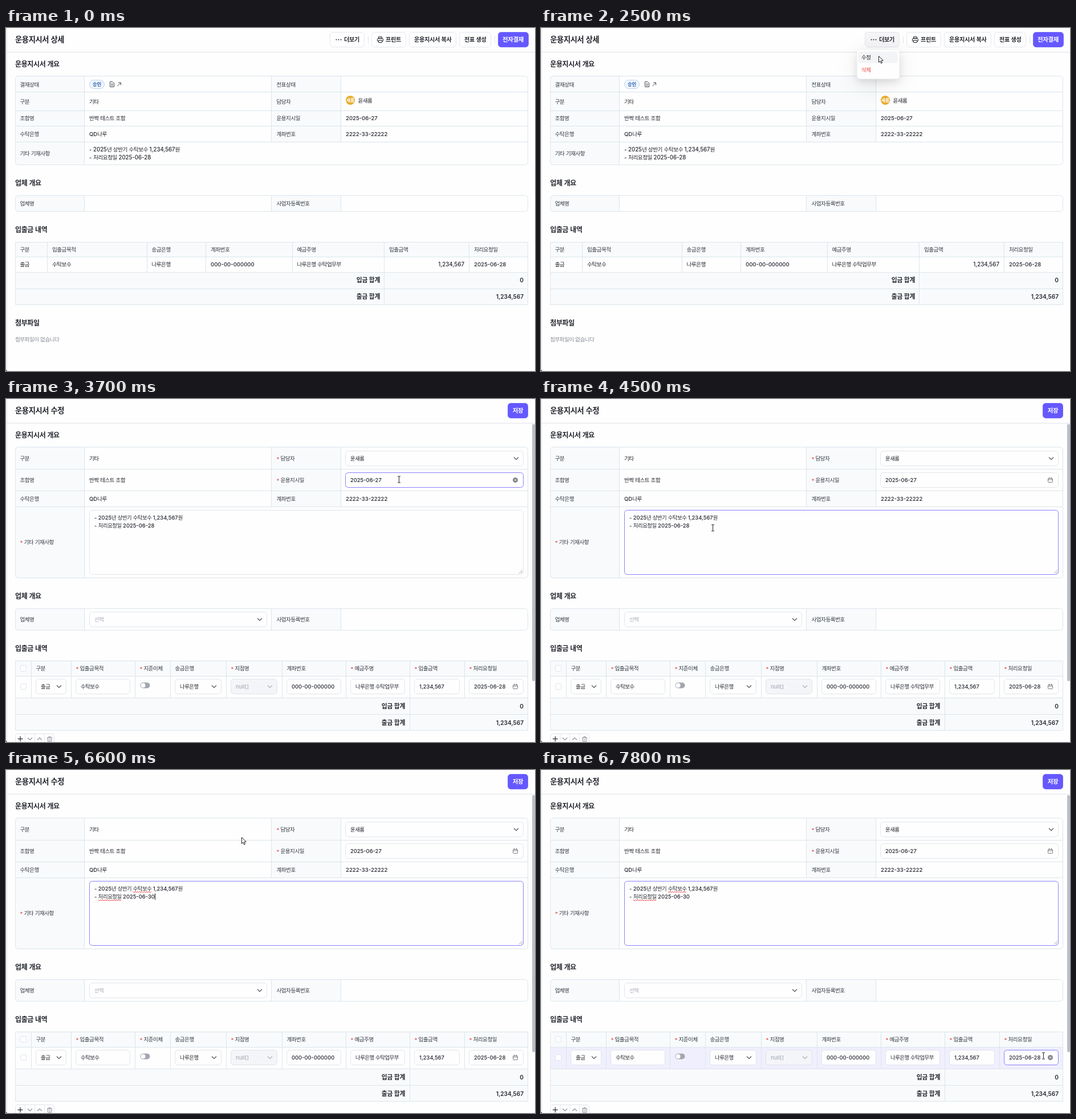
These frames come from a looping animation (928 by 603 pixels, 8 s). An HTML page with a canvas:

```html
<!DOCTYPE html>
<html lang="ko">
<head>
<meta charset="utf-8">
<title>운용지시서</title>
<style>
html, body { margin: 0; width: 100%; height: 100%; overflow: hidden; background: #fefefe; }
canvas { display: block; width: 928px; height: 603px; }
</style>
</head>
<body>
<canvas id="stage" width="928" height="603"></canvas>
<script>
const ctx = document.getElementById('stage').getContext('2d');
const LOOP = 8000, STEP = 100;
const FAMILY = 'Inter, "Noto Sans CJK KR", "Noto Sans CJK", "Noto Sans CJK JP", sans-serif';
const INK = '#23262d', LABEL = '#33373f', MUTED = '#a8aeb8', LINE = '#dce5eb', EDGE = '#d9dce5';
const TINT = '#f8fafc', PAPER = '#fefefe', PURPLE = '#6558ff', RED = '#ee4a44';
const BODY = 9.55, FIELD = 9.4, HAIR = 0.75;
const PERSON = '윤새롬', GROUP = '반짝 테스트 조합', TRUST = 'QD나루', BANK = '나루은행', HOLDER = BANK + ' 수탁업무부';
const NOTE = '- 2025년 상반기 수탁보수 1,234,567원', ASK = '- 처리요청일 2025-06-';

// Hangul and the rest are set in separate runs, as Hangul is tracked tighter.
function runs(s, size, weight, each) {
  ctx.font = `${weight} ${size}px ${FAMILY}`;
  let x = 0;
  for (const run of s.match(/[가-힣]+|[^가-힣]+/g) || []) {
    ctx.letterSpacing = /[가-힣]/.test(run) ? `${size * (weight >= 600 ? -0.03 : -0.05)}px` : '0px';
    if (each) each(run, x);
    x += ctx.measureText(run).width;
  }
  return x;
}

function text(s, x, cy, { size = BODY, weight = 450, color = INK, align = 0 } = {}) {
  const left = x - (align ? runs(s, size, weight) * align : 0);
  ctx.fillStyle = color;
  runs(s, size, weight, (run, dx) => ctx.fillText(run, left + dx, cy + size * 0.37));
}

const width = s => runs(s, FIELD, 450);
const label = (s, x, y) => text(s, x, y, { color: LABEL });
const heading = (s, y) => text(s, 16, y, { size: 12, weight: 600 });

function required(s, x, y) {
  text('*', x, y + 1, { color: RED });
  label(s, x + 7, y);
}

function path(points, color, w = 1, fill, close) {
  ctx.beginPath();
  points.forEach(([x, y], i) => i ? ctx.lineTo(x, y) : ctx.moveTo(x, y));
  if (close) ctx.closePath();
  if (fill) { ctx.fillStyle = fill; ctx.fill(); }
  if (color) { ctx.strokeStyle = color; ctx.lineWidth = w; ctx.stroke(); }
}

function rect(x, y, w, h, fill) {
  ctx.fillStyle = fill;
  ctx.fillRect(x, y, w, h);
}

function box(x0, y0, x1, y1, r, fill, edge, w = 1) {
  ctx.beginPath();
  ctx.roundRect(x0 + 0.5, y0 + 0.5, x1 - x0 - 1, y1 - y0 - 1, r);
  if (fill) { ctx.fillStyle = fill; ctx.fill(); }
  if (edge) { ctx.strokeStyle = edge; ctx.lineWidth = w; ctx.stroke(); }
}

function disc(x, y, r, fill) {
  ctx.beginPath();
  ctx.arc(x, y, r, 0, Math.PI * 2);
  ctx.fillStyle = fill;
  ctx.fill();
}

// rows: line heights; cols: [x, top, bottom]; tints: [x0, y0, x1, y1]
function grid(y0, y1, r, tints, rows, cols) {
  ctx.save();
  ctx.beginPath();
  ctx.roundRect(16, y0, 900, y1 - y0, r);
  ctx.clip();
  for (const [a, b, c, d, color = TINT] of tints) rect(a, b, c - a, d - b, color);
  for (const y of rows) rect(16, y, 900, 1, LINE);
  for (const [x, a = y0, b = y1] of cols) rect(x, a, 1, b - a, LINE);
  ctx.restore();
  box(16, y0, 916, y1, r, null, LINE);
}

const pairTints = (y0, y1, full = y1) => [[16, y0, 137, y1], [465, y0, 587, full]];
const pairCols = (y0, y1, full = y1) => [[137, y0, y1], [465, y0, full], [587, y0, full]];

function chevron(x, y, color = '#4b505a', d = 1, s = 4) {
  path([[x - s, y - d * s / 2], [x, y + d * s / 2], [x + s, y - d * s / 2]], color, 1.1);
}

function calendar(x, y) {
  box(x - 4.5, y - 3.5, x + 4.5, y + 4.5, 1, null, '#50555f', HAIR);
  path([[x - 4, y - 0.7], [x + 4, y - 0.7]], '#50555f', HAIR);
  path([[x - 2, y - 5], [x - 2, y - 2]], '#50555f', HAIR);
  path([[x + 2, y - 5], [x + 2, y - 2]], '#50555f', HAIR);
}

function clearMark(x, y) {
  disc(x, y, 4.5, '#84878d');
  path([[x - 1.6, y - 1.6], [x + 1.6, y + 1.6]], '#fff');
  path([[x + 1.6, y - 1.6], [x - 1.6, y + 1.6]], '#fff');
}

function input(x0, x1, cy, s, { edge = EDGE, fill = PAPER, color = INK, arrow } = {}) {
  box(x0, cy - 13.5, x1, cy + 13.5, 5, fill, edge, HAIR);
  ctx.save();
  ctx.beginPath();
  ctx.rect(x0 + 9, cy - 12, x1 - x0 - 20, 24);
  ctx.clip();
  text(s, x0 + 9, cy, { size: FIELD, color });
  ctx.restore();
  if (arrow) chevron(x1 - 13, cy, arrow);
}

function dateInput(x0, x1, cy, s, hot) {
  input(x0, x1, cy, s, { edge: hot ? PURPLE : EDGE });
  (hot ? clearMark : calendar)(x1 - 14.5, cy);
}

function button(x0, x1, s, tx, fill = PAPER) {
  const solid = fill === PURPLE;
  box(x0, 7, x1, 34, 5, fill, solid ? PURPLE : '#dddfe7', HAIR);
  text(s, tx, 20, { size: solid ? 10.4 : 10.1, weight: 600, color: solid ? '#fff' : INK });
}

function frame(title) {
  rect(0, 0, 928, 603, PAPER);
  rect(1, 0, 1, 603, '#e3e4e8');
  rect(2, 42, 926, 1, '#e2e3e9');
  path([[0, 600.5], [2, 603], [0, 603]], null, 0, '#444', true);
  text(title, 16, 20.5, { size: 13.3, weight: 600 });
}

function printer(x, y) {
  box(x - 3.5, y - 5.5, x + 3.5, y - 2, 0, null, INK);
  box(x - 5.5, y - 2.5, x + 5.5, y + 3.5, 1.5, PAPER, INK);
  box(x - 3.5, y + 0.5, x + 3.5, y + 5.5, 0.5, PAPER, INK);
}

function statusIcons() {
  box(146, 91, 173, 107, 8, '#f0f6fe', '#bdd5f2');
  text('승인', 159.5, 99, { size: 8.3, weight: 600, color: '#2c5fae', align: 0.5 });
  path([[182.5, 94.5], [187, 94.5], [189.5, 97], [189.5, 103.5], [182.5, 103.5]], '#4a4e57', 1, null, true);
  path([[184, 98.5], [188, 98.5]], '#4a4e57');
  path([[184, 101], [188, 101]], '#4a4e57');
  path([[195.5, 102], [201.5, 96]], '#4a4e57');
  path([[197, 96], [201.5, 96], [201.5, 100.5]], '#4a4e57');
}

function viewPage(active) {
  frame('운용지시서 상세');
  button(568, 629, '더보기', 593, active ? '#f5f5f7' : PAPER);
  for (const x of [579.5, 583.5, 587.5]) disc(x, 20.5, 1, INK);
  rect(635, 14, 1, 13, '#e2e4ea');
  button(641, 702, '프린트', 666);
  printer(656.5, 20.5);
  button(707, 790, '운용지시서 복사', 716);
  button(795, 851, '전표 생성', 804);
  rect(857, 14, 1, 13, '#e2e4ea');
  button(863, 917, '전자결재', 871, PURPLE);

  heading('운용지시서 개요', 63.5);
  grid(84, 241, 5, pairTints(84, 241, 200), [112, 145, 172, 200], pairCols(84, 241, 200));
  const rows = [['결재상태', '', '전표상태', '', 99], ['구분', '기타', '담당자', '', 129],
    ['조합명', GROUP, '운용지시일', '2025-06-27', 158.5], ['수탁은행', TRUST, '계좌번호', '2222-33-22222', 186.5]];
  for (const [a, b, c, d, y] of rows) {
    label(a, 24.5, y); text(b, 146, y); label(c, 474.5, y); text(d, 596, y);
  }
  statusIcons();
  disc(604, 127, 8, '#e9ac2e');
  text(PERSON.slice(1), 604, 127, { size: 7.8, weight: 600, color: '#fff', align: 0.5 });
  text(PERSON, 617.5, 127.5);
  label('기타 기재사항', 24.5, 220.5);
  text(NOTE, 146, 213, { size: 9.65 });
  text(ASK + '28', 146, 227.5, { size: 9.65 });

  heading('업체 개요', 273);
  grid(294, 323, 5, pairTints(294, 323), [], pairCols(294, 323));
  label('업체명', 24.5, 308.5);
  label('사업자등록번호', 474.5, 308.5);

  heading('입출금 내역', 355);
  grid(376, 487, 0, [[16, 376, 916, 402], [16, 429, 916, 487]], [402, 429, 458],
    [[72, 376, 429], [247, 376, 429], [350, 376, 429], [502, 376, 429], [663], [812, 376, 429]]);
  const cols = [[24.5, '구분', '출금'], [81, '입출금목적', '수탁보수'], [255.5, '송금은행', BANK],
    [359, '계좌번호', '000-00-000000'], [510.5, '예금주명', HOLDER], [672, '입출금액', ''], [821, '처리요청일', '2025-06-28']];
  for (const [x, a, b] of cols) { label(a, x, 389); text(b, x, 415.5); }
  text('1,234,567', 804, 415.5, { size: 9.8, align: 1 });
  totals(656, 443.5, 472.5);

  heading('첨부파일', 519);
  text('첨부파일이 없습니다', 16, 547.5, { color: '#858b94' });
}

function totals(right, y0, y1) {
  for (const [name, sum, y] of [['입금', '0', y0], ['출금', '1,234,567', y1]]) {
    text(name + ' 합계', right, y, { size: 10.8, weight: 600, align: 1 });
    text(sum, 908, y, { size: 10.1, weight: 600, align: 1 });
  }
}

function menu(alpha, scale, hot) {
  ctx.save();
  ctx.globalAlpha = alpha;
  ctx.translate(0, 38);
  ctx.scale(1, scale);
  ctx.translate(0, -38);
  for (const [blur, dy, a] of [[40, 8, 0.1], [14, 5, 0.1]]) {
    ctx.shadowColor = `rgba(0,0,0,${a})`;
    ctx.shadowBlur = blur;
    ctx.shadowOffsetY = dy;
    box(554, 38, 629, 90, 5, PAPER);
  }
  ctx.shadowColor = 'transparent';
  if (hot) box(556, 41, 626, 62, 3, '#f3f4f6');
  text('수정', 562, 51.5);
  text('삭제', 562, 73.5, { color: RED });
  ctx.restore();
}

function squiggle(x, w, y) {
  const pts = [];
  for (let i = 0; i <= w; i += 2) pts.push([x + i, y + (i % 4 ? 1 : -1)]);
  path(pts, '#ee3b3b', 1);
}

function textarea(t, hot) {
  box(146, 195, 908, 309, 5, PAPER, hot ? PURPLE : EDGE, HAIR);
  path([[900, 306.5], [906, 300.5]], '#888', 0.8);
  path([[903.5, 306.5], [906, 304]], '#888', 0.8);
  const tail = t < 5500 ? '28' : t < 5700 ? '2' : t < 6100 ? '' : t < 6300 ? '3' : '30';
  text(NOTE, 155, 208.5, { size: FIELD });
  text(ASK + tail, 155, 223, { size: FIELD });
  if (t < 4700) return;
  squiggle(155 + width('- 2025년 상반기 '), width('수탁보수'), 214.5);
  squiggle(155 + width('- '), width('처리요청일'), 229);
  const edit = [4700, 5500, 5700, 6100, 6300].filter(k => k <= t).pop();
  if (Math.floor((t - edit) / 500) % 2 === 0) rect(Math.round(155 + width(ASK + tail)), 217, 1, 11, '#111');
}

function editPage(t, over) {
  const onDate = over(596, 129, 908, 156), onRow = over(16, 487, 916, 525);
  frame('운용지시서 수정');
  button(880, 916, '저장', 888.8, PURPLE);

  heading('운용지시서 개요', 63.5);
  grid(84, 315, 5, pairTints(84, 315, 189), [123, 161, 189], pairCols(84, 315, 189));
  label('구분', 24.5, 104); text('기타', 146, 104);
  label('조합명', 24.5, 142.5); text(GROUP, 146, 142.5);
  label('수탁은행', 24.5, 175.5); text(TRUST, 146, 175.5);
  required('담당자', 474.5, 104);
  required('운용지시일', 474.5, 142.5);
  label('계좌번호', 474.5, 175.5); text('2222-33-22222', 596, 175.5);
  required('기타 기재사항', 24.5, 251.5);
  input(595, 908, 104.5, PERSON, { arrow: '#4b505a' });
  dateInput(595, 908, 142.5, '2025-06-27', onDate);
  textarea(t, t >= 4500 || over(146, 195, 908, 309));

  heading('업체 개요', 347);
  grid(368, 407, 5, pairTints(368, 407), [], pairCols(368, 407));
  label('업체명', 24.5, 387);
  input(146, 458, 387.5, '선택', { color: MUTED, arrow: '#4b505a' });
  label('사업자등록번호', 474.5, 387);

  heading('입출금 내역', 439);
  grid(460, 583, 0, [[16, 460, 916, 487], [16, 487, 916, 525, onRow ? '#f0effd' : PAPER], [16, 525, 916, 583]],
    [487, 525, 554], [44, 114, 226, 288, 386, 484, 596, 708, 804].map(x => x === 708 ? [x] : [x, 460, 525]));
  for (const y of [468, 500]) box(25, y, 36, y + 11, 2, PAPER, '#e0e3e9');
  label('구분', 52.5, 473);
  label('송금은행', 296.5, 473);
  label('계좌번호', 492.5, 473);
  for (const [s, x] of [['입출금목적', 122.5], ['지준이체', 234.5], ['지점명', 394.5], ['예금주명', 604.5],
    ['입출금액', 716.5], ['처리요청일', 812.5]]) required(s, x, 473);
  const y = 505.5;
  input(52, 106, y, '출금', { arrow: '#4b505a' });
  input(122, 218, y, '수탁보수');
  box(235, 498, 253, 509, 5.5, '#a3a6ae');
  disc(240.5, 503.5, 4, '#fff');
  input(296, 378, y, BANK, { arrow: '#4b505a' });
  input(394, 476, y, 'null[]', { fill: '#f4f5f8', color: MUTED, arrow: MUTED });
  input(492, 588, y, '000-00-000000');
  input(604, 700, y, HOLDER);
  input(716, 796, y, '1,234,567');
  dateInput(812, 908, y, '2025-06-28', over(812, 492, 908, 519));
  totals(700, 540, 569);

  box(16, 588, 85, 612, 4, PAPER, EDGE, HAIR);
  for (const x of [33, 50, 67]) rect(x, 588, 1, 15, '#e0e3e9');
  path([[20.5, 597.5], [29.5, 597.5]], INK, 1.2);
  path([[25, 593], [25, 602]], INK, 1.2);
  chevron(42, 597.5, '#8a8f98');
  chevron(59, 597.5, '#8a8f98', -1);
  path([[72, 595.5], [81, 595.5]], '#8a8f98');
  path([[75, 595], [75, 593.5], [78, 593.5], [78, 595]], '#8a8f98');
  box(72.5, 595, 80.5, 602.5, 1, null, '#8a8f98');
  path([[75.5, 597.5], [75.5, 600.5]], '#8a8f98', 0.8);
  path([[77.5, 597.5], [77.5, 600.5]], '#8a8f98', 0.8);

  if (t >= 2900) box(922.5, 43.5, 928.5, 496.5, 2.5, over(915, 44, 928, 496) ? '#a6a9b8' : '#bbbecb');
}

// Pointer route: time, x, y
const ROUTE = [[200, 660, 82], [700, 594, 27], [1400, 594, 27], [1700, 592, 49], [3100, 592, 49], [3300, 693, 127],
  [3400, 693, 127], [3700, 689, 141], [3900, 689, 141], [4500, 301, 226], [6599, 301, 226], [6600, 413, 118],
  [6700, 413, 118], [7200, 920, 420], [7600, 896, 558], [7800, 881, 502]];

function pointer(t) {
  const i = ROUTE.findIndex(k => k[0] >= t);
  if (i < 0) return ROUTE[ROUTE.length - 1].slice(1);
  if (i === 0) return t < ROUTE[0][0] ? [-99, -99] : ROUTE[0].slice(1);
  const [t0, x0, y0] = ROUTE[i - 1], [t1, x1, y1] = ROUTE[i];
  const u = (t - t0) / (t1 - t0), e = u * u * (3 - 2 * u);
  return [x0 + (x1 - x0) * e, y0 + (y1 - y0) * e];
}

const cursors = {
  arrow() {
    path([[0, 0], [0, 10.8], [2.5, 8.6], [4.2, 12.6], [6, 11.8], [4.3, 7.9], [7.8, 7.7]], '#222', 1, '#fff', true);
  },
  beam() {
    for (const [color, w] of [['#fff', 2.4], ['#222', 1]]) {
      path([[0, -5], [0, 5]], color, w);
      path([[-2.5, -5.5], [2.5, -5.5]], color, w);
      path([[-2.5, 5.5], [2.5, 5.5]], color, w);
    }
  },
  hand() {
    ctx.lineJoin = 'round';
    path([[-0.8, 0.8], [0.2, 0], [1.3, 0.8], [2, 5], [4, 4.6], [5, 5.4], [6.6, 5], [7.6, 6.2], [9, 6.4], [9.3, 8.2],
      [8.5, 12.5], [8.3, 15], [2, 15.4], [-0.8, 12], [-3.8, 8.8], [-3.2, 7.6], [-1.4, 8], [0.4, 9.2]],
      '#222', 1, '#fff', true);
    for (const x of [3.2, 5, 6.8]) path([[x, 10], [x + 0.2, 13]], '#222', 0.7);
    ctx.lineJoin = 'miter';
  }
};

function draw(t) {
  const [px, py] = pointer(t);
  const over = (a, b, c, d) => px >= a && px < c && py >= b && py < d;
  const editing = t >= 2600, open = t >= 1200 && !editing;
  const onMore = over(568, 7, 629, 34);
  if (editing) editPage(t, over);
  else viewPage(open || onMore);
  if (open) t < 1300 ? menu(0.28, 0.88) : menu(1, 1, over(554, 40, 629, 62));
  let kind = 'arrow';
  if (!editing && onMore) kind = 'hand';
  if (editing && (over(596, 129, 908, 156) || over(146, 195, 908, 309) || over(812, 492, 908, 519))) kind = 'beam';
  ctx.save();
  ctx.translate(Math.round(px) + 0.5, Math.round(py) + 0.5);
  cursors[kind]();
  ctx.restore();
}

function tick(now) {
  const t = now % LOOP;
  draw(Math.floor(t / STEP) * STEP);
  requestAnimationFrame(tick);
}
requestAnimationFrame(tick);
</script>
</body>
</html>
```
